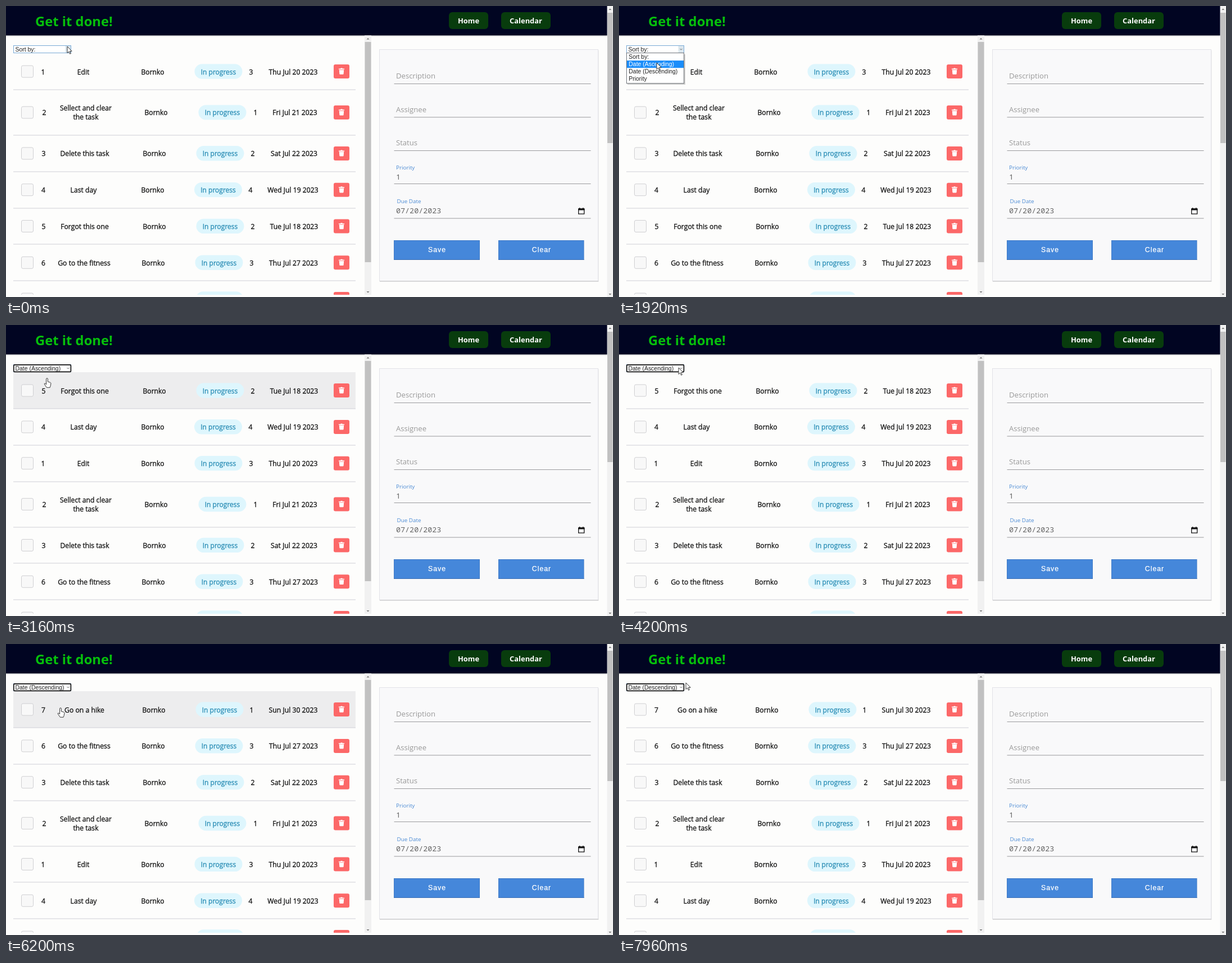
Recreate the animation shown at these times as an HTML page. Size 1080 by 518 pixels, loop 8 s.

```html
<!DOCTYPE html>
<html lang="en">
<head>
<meta charset="utf-8">
<title>Get it done!</title>
<style>
html, body { margin: 0; width: 100%; height: 100%; overflow: hidden; background: #fdfdfc; }
svg { display: block; width: 100%; height: 100%; }
text { font-family: "Open Sans", "Noto Sans", sans-serif; }
.row text { font-size: 12.2px; fill: #111; stroke: #111; stroke-width: .3px; text-anchor: middle; }
.row .status { fill: #2a8db5; stroke: #2a8db5; font-size: 12px; }
.logo { font-size: 23.8px; font-weight: 700; fill: #06c00b; }
.nav text { font-size: 12.9px; font-weight: 700; fill: #fff; text-anchor: middle; }
.field { font-size: 13.1px; fill: #999; }
.label { font-size: 9.85px; fill: #4a8ad4; }
.value { font-size: 13.1px; fill: #555; }
.date { font: 13.4px "Noto Sans Mono", "DejaVu Sans Mono", monospace; fill: #666; }
.btn rect { fill: #4587da; stroke: #3f7bc8; }
.btn path { stroke: #386cb3; }
.btn text { font: 12.3px "Liberation Sans", Arial, sans-serif; letter-spacing: 1px; fill: #fff; stroke: #fff; stroke-width: .25px; text-anchor: middle; }
.opt { font: 10.45px "Liberation Sans", Arial, sans-serif; fill: #222; }
.hl .opt { fill: #fff; }

.step { animation: 8s step-end infinite; }
#list0 { animation-name: list0; }
#list1 { animation-name: list1; }
#list2 { animation-name: list2; }
#focus { animation-name: focus; }
#menu { animation-name: menu; }
#hl0 { animation-name: hl0; }
#hl1 { animation-name: hl1; }
#hl2 { animation-name: hl2; }
#hover, #hand { animation-name: over; }
#arrow { animation-name: away; }
#cursor { animation: move 8s ease-in-out infinite; }

@keyframes list0 { 0% { opacity: 1 } 32%, to { opacity: 0 } }
@keyframes list1 { 0% { opacity: 0 } 32% { opacity: 1 } 73.5%, to { opacity: 0 } }
@keyframes list2 { 0% { opacity: 0 } 73.5%, to { opacity: 1 } }
@keyframes focus { 0% { opacity: 0 } 32% { opacity: 1 } 55% { opacity: 0 } 73.5%, to { opacity: 1 } }
@keyframes menu { 0% { opacity: 0 } 10.5% { opacity: 1 } 32% { opacity: 0 } 55% { opacity: 1 } 73.5%, to { opacity: 0 } }
@keyframes hl0 { 0% { opacity: 1 } 21.5%, to { opacity: 0 } }
@keyframes hl1 { 0% { opacity: 0 } 21.5% { opacity: 1 } 69.5%, to { opacity: 0 } }
@keyframes hl2 { 0% { opacity: 0 } 69.5%, to { opacity: 1 } }
@keyframes over { 0% { opacity: 0 } 32% { opacity: 1 } 46.5% { opacity: 0 } 73.5% { opacity: 1 } 93%, to { opacity: 0 } }
@keyframes away { 0% { opacity: 1 } 32% { opacity: 0 } 46.5% { opacity: 1 } 73.5% { opacity: 0 } 93%, to { opacity: 1 } }
@keyframes move {
  0%, 5% { transform: translate(109px, 72px) }
  9%, 15.5% { transform: translate(105px, 76px) }
  24%, 28% { transform: translate(67px, 101px) }
  32%, 40% { transform: translate(73px, 95px) }
  49.5%, 60.5% { transform: translate(106px, 76px) }
  67% { transform: translate(98px, 89px) }
  71%, 88% { transform: translate(97px, 114px) }
  97%, to { transform: translate(119px, 69px) }
}
</style>
</head>
<body>
<svg viewBox="0 0 1080 518">
  <defs>
    <linearGradient id="shade" x2="0" y2="1">
      <stop stop-color="#000" stop-opacity=".2"/>
      <stop offset="1" stop-color="#000" stop-opacity="0"/>
    </linearGradient>
    <clipPath id="pane"><rect y="52" width="638" height="462"/></clipPath>
    <g id="bin">
      <rect x="-14" y="-12.5" width="28" height="25" rx="3" fill="#fc6868"/>
      <path d="M-5-5h3l.8-1h2.4l.8 1h3v1.5H-5zM-4.2-2.8h8.4l-.6 7.2q-.1.8-.9.8h-5.4q-.8 0-.9-.8z" fill="#fff"/>
    </g>
  </defs>

  <rect width="1080" height="518" fill="#fdfdfc"/>
  <rect y="52" width="1070" height="3" fill="url(#shade)"/>
  <rect width="1070" height="52.4" fill="#010522"/>
  <text class="logo" x="52" y="35.8">Get it done!</text>
  <g class="nav">
    <rect x="788" y="11" width="70" height="30" rx="6" fill="#083c0d"/>
    <text x="823" y="31.2">Home</text>
    <rect x="881" y="11" width="88" height="30" rx="6" fill="#083c0d"/>
    <text x="925" y="31.2">Calendar</text>
  </g>

  <g id="bars"></g>

  <rect x="665" y="79" width="389.5" height="412" fill="#000" opacity=".1"/>
  <rect x="664.5" y="77.5" width="389" height="412" fill="#f9f9fa" stroke="#e2e2e8"/>
  <path d="M665 489.8h389" stroke="#c9c9cc"/>
  <g id="lines" fill="#9a9a9d"></g>
  <text class="field" x="694" y="129.4">Description</text>
  <text class="field" x="694" y="189">Assignee</text>
  <text class="field" x="694" y="248.2">Status</text>
  <text class="label" x="694" y="290.8">Priority</text>
  <text class="value" x="694.3" y="309.3">1</text>
  <text class="label" x="695.5" y="350.6">Due Date</text>
  <text class="date" x="694" y="369.4">07/20/2023</text>
  <path d="M1018.7 361.2h10v9h-10z" fill="none" stroke="#111" stroke-width="1.3"/>
  <path d="M1018 360.5h11.4v3H1018zM1020 359h1.4v2H1020zM1026 359h1.4v2H1026z" fill="#111"/>
  <g class="btn">
    <rect x="690.5" y="417.5" width="152" height="34"/>
    <path d="M690 451.5h153"/>
    <text x="767" y="437.6">Save</text>
    <rect x="876.5" y="417.5" width="151.5" height="34"/>
    <path d="M876 451.5h152.5"/>
    <text x="953" y="437.6">Clear</text>
  </g>

  <g clip-path="url(#pane)">
    <rect id="hover" class="step" x="13" y="84" width="609" height="65" fill="#ededee"/>
    <rect x="13.5" y="70.5" width="102" height="13" fill="#fff" stroke="#79aad6"/>
    <rect x="105.5" y="71" width="9.5" height="12" fill="#dce7ee"/>
    <g id="focus" class="step">
      <rect x="13.8" y="70.8" width="101.6" height="12.6" rx="1.5" fill="#fff" stroke="#111" stroke-width="1.7"/>
    </g>
    <path d="M108.5 76l2 2 2-2" fill="none" stroke="#555" stroke-width=".9"/>
    <g id="lists"></g>
  </g>

  <g id="menu" class="step">
    <rect x="15" y="86" width="103" height="54" fill="#000" opacity=".18"/>
    <rect x="13.5" y="83.5" width="102" height="54.2" fill="#fff" stroke="#6f747a"/>
  </g>

  <g id="cursor">
    <path id="arrow" class="step" d="M0 0v11.6l2.7-2.5 1.9 4.2 1.8-.8-1.9-4.1h3.7z" fill="#fff" stroke="#222" stroke-width=".9"/>
    <path id="hand" class="step" d="M-1.4 9V1.2a1.4 1.4 0 0 1 2.8 0V6l4 1.1q1.7.6 1.5 2.4l-.8 4.200-1 2.600H-.6l-3.600-5.200q-1.400-2 .2-2.200 1.200 0 2.600 2z" fill="#fff" stroke="#222" stroke-width=".9"/>
  </g>
</svg>
<script>
const $ = id => document.getElementById(id);
const text = (x, y, s, cls = '') => `<text class="${cls}" x="${x}" y="${y}">${s}</text>`;
const rect = (x, y, w, h, rest) => `<rect x="${x}" y="${y}" width="${w}" height="${h}" ${rest}/>`;

// description, priority, date, then centres of number, description, name, status, priority, date
const tasks = {
  1: ['Edit', 3, 'Thu Jul 20 2023', 66, 137.5, 261, 378, 436, 511],
  2: ['Sellect and clear|the task', 1, 'Fri Jul 21 2023', 68, 142, 267, 385, 444, 514],
  3: ['Delete this task', 2, 'Sat Jul 22 2023', 67, 140, 264, 381, 439, 512.5],
  4: ['Last day', 4, 'Wed Jul 19 2023', 66.5, 138, 261, 377.5, 435, 510.5],
  5: ['Forgot this one', 2, 'Tue Jul 18 2023', 67, 140, 264, 381, 439, 512.5],
  6: ['Go to the fitness', 3, 'Thu Jul 27 2023', 66.5, 139, 262, 379, 437, 511.5],
  7: ['Go on a hike', 1, 'Sun Jul 30 2023', 66.5, 139.5, 263, 380, 437, 511]
};

function row(id, top, h) {
  const [desc, prio, date, xId, xDesc, xName, xStat, xPrio, xDate] = tasks[id];
  const mid = top + h / 2, base = mid + 4.9, parts = desc.split('|');
  const first = base - (parts.length - 1) * 8;
  return '<g class="row">' +
    rect(27.5, mid - 10.5, 21, 21, 'rx="2.5" fill="#f8f8f8" stroke="#cfcfd2"') +
    text(xId, base, id) +
    parts.map((s, i) => text(xDesc, first + i * 16, s)).join('') +
    text(xName, base, 'Bornko') +
    rect(xStat - 42.5, mid - 13.3, 85, 26.4, 'rx="13.2" fill="#def6fd"') +
    text(xStat, base, 'In progress', 'status') +
    text(xPrio, base, prio) + text(xDate, base, date) +
    `<use href="#bin" x="597" y="${mid}"/>` +
    rect(13, Math.round(top + h) - .5, 609, 1, 'fill="#cfd0d6"') + '</g>';
}

function list(order, label, n) {
  let top = 84.2, out = text(16.5, 80.6, label, 'opt');
  for (const id of order) {
    const h = id === '2' ? 81 : 64.8;
    out += row(id, top, h);
    top += h;
  }
  return `<g id="list${n}" class="step">${out}</g>`;
}

const options = ['Sort by:', 'Date (Ascending)', 'Date (Descending)', 'Priority'];
const orders = ['1234567', '5412367', '7632145'];
$('lists').innerHTML = orders.map((o, i) => list(o, options[i], i)).join('');

const item = (s, i) => text(17.3, 93.9 + i * 13.1, s, 'opt');
$('menu').innerHTML += options.map(item).join('') + options.slice(0, 3).map((s, i) =>
  `<g id="hl${i}" class="step hl">${rect(14, 84 + i * 13.1, 101, 13.1, 'fill="#1b8dfa"')}${item(s, i)}</g>`).join('');

$('lines').innerHTML = [138, 197.5, 257, 316, 377.5].map(y => rect(690.5, y, 350, 1, '')).join('');

function bar(x, w, top, bottom, from, to) {
  const c = x + w / 2;
  const tip = (y, d) => `<path d="M${c - 2.5} ${y + d}h5l-2.5 ${-2.5 * d}z" fill="#777"/>`;
  return rect(x, top, w, bottom - top, 'fill="#f1f1f1"') +
    rect(x + .5, from, w - 1, to - from, 'fill="#c1c1c1"') +
    tip(top + 6, 1) + tip(bottom - 5, -1);
}
$('bars').innerHTML = bar(638, 12, 52.4, 514, 64, 456) + bar(1069.5, 10.5, 0, 518, 12, 244);
</script>
</body>
</html>
```
